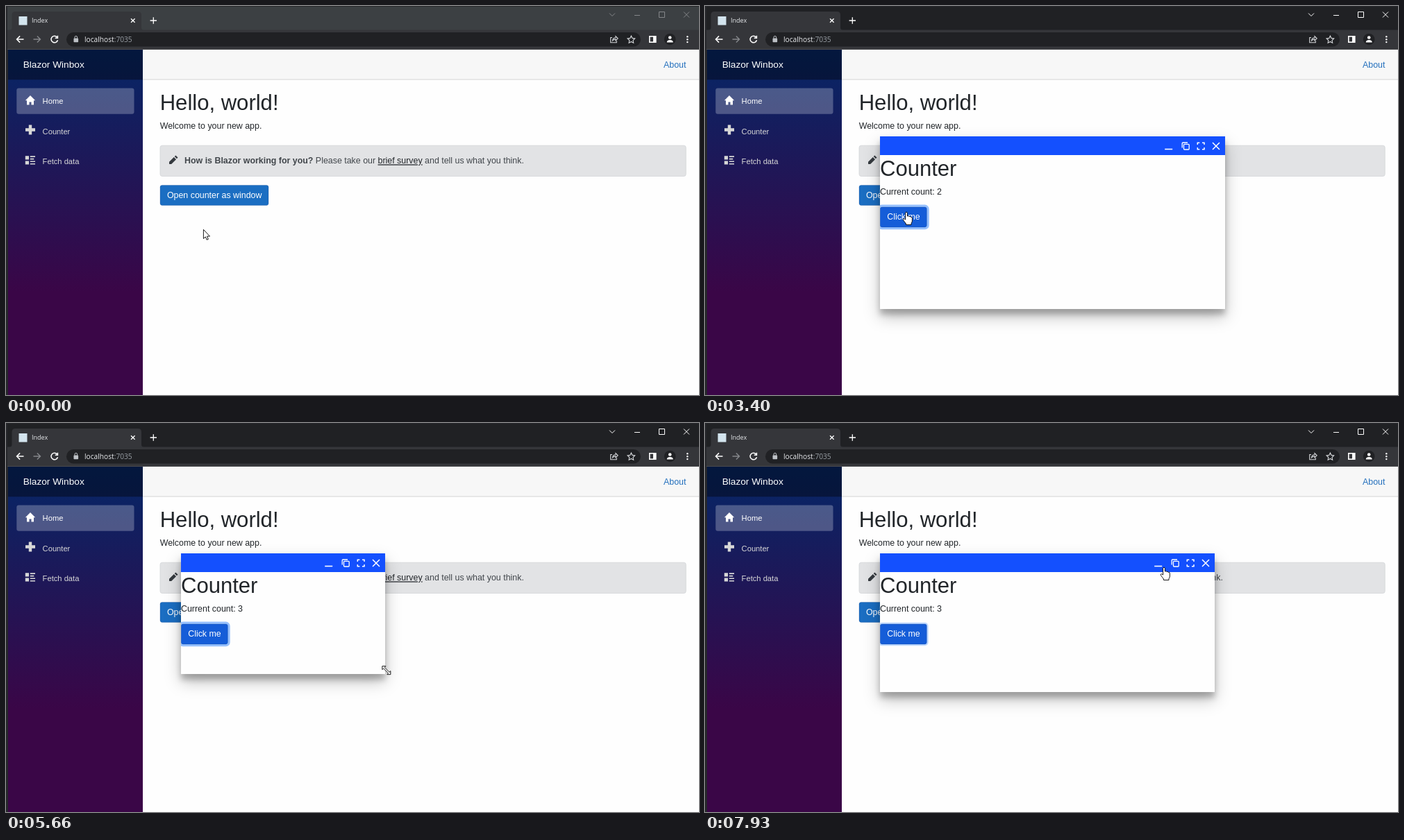
Write an HTML page that moves like this. It is 998 by 561 pixels and loops after 8000 ms.

```html
<!DOCTYPE html>
<html lang="en">
<head>
<meta charset="utf-8">
<title>Blazor Winbox</title>
<style>
  html, body { margin: 0; width: 100%; height: 100%; overflow: hidden; background: #fefefe; }
  svg { position: absolute; left: 0; top: 0; overflow: visible; }
  text { font: 12.42px 'Liberation Sans', Arial, sans-serif; fill: #212529; white-space: pre; }
  .h1 { font-size: 31.05px; }
  .brand { font-size: 13.66px; fill: #fff; }
  .nav { font-size: 11.18px; fill: #d7d7d7; }
  .white { fill: #fff; }
  .ui { font: 10.2px 'Open Sans', 'Noto Sans', sans-serif; fill: #e8eaed; }
  .line { fill: none; stroke: #fff; stroke-width: 1.3; }
  .ring { fill: none; stroke: rgba(49, 132, 253, .5); }
  .face { stroke: rgba(10, 60, 140, .35); stroke-width: .8; }
  #win { position: absolute; left: 251.8px; top: 187.5px; background: #fefefe;
    box-shadow: 0 10.9px 21.7px rgba(0,0,0,.25), 0 7.8px 7.8px rgba(0,0,0,.22); }
  #body { position: absolute; inset: 0; overflow: hidden; }
  #bar { position: absolute; left: 0; right: 0; top: 0; height: 27.2px; background: #1450fe; }
  #controls { left: auto; right: 0; }
  #cursor path { fill: #fff; stroke: #000; stroke-width: .9; stroke-linejoin: round; }
</style>
</head>
<body>
<svg width="998" height="561" viewBox="0 0 998 561">
  <defs>
    <linearGradient id="side" x1="0" y1="0" x2="0" y2="1">
      <stop offset="0" stop-color="#052767"/><stop offset=".7" stop-color="#3a0647"/>
    </linearGradient>
  </defs>
  <!-- browser frame -->
  <rect width="998" height="561" fill="#26272b"/>
  <rect id="strip" x="2" y="1" width="996" height="34"/>
  <path d="M4 35Q8.5 35 8.5 31V13Q8.5 8 13.5 8H190Q195 8 195 13V31Q195 35 199.5 35Z" fill="#35363a"/>
  <rect x="2" y="34.5" width="996" height="28.5" fill="#35363a"/>
  <rect x="2" y="62" width="996" height="1" fill="#4a4b4f"/>
  <rect x="18.5" y="15" width="12" height="12.5" fill="#d3e4ee"/>
  <text class="ui" x="37" y="24.2" style="font-size:9px">Index</text>
  <g class="line">
    <path d="M180 18.2l5.6 5.6m0-5.6l-5.6 5.6M212.3 16.3v9.4m-4.7-4.7h9.4"/>
    <path d="M25.5 48H15.5m4.6-4.6L15.5 48l4.6 4.6" stroke-width="1.5"/>
    <path d="M39.5 48h10m-4.6-4.6l4.6 4.6l-4.6 4.6" stroke="#85878b" stroke-width="1.4"/>
    <path d="M73.6 45A4.8 4.8 0 1 0 74.5 49.2M74.4 42.8v3.4h-3.6" stroke-width="1.5"/>
  </g>
  <rect x="87" y="38" width="827" height="20.5" rx="10.2" fill="#202124"/>
  <rect x="97.5" y="46.6" width="6.6" height="5.6" rx=".8" fill="#bdc1c6"/>
  <path class="line" d="M99 46.8v-1.7a1.8 1.8 0 0 1 3.6 0v1.7" stroke="#bdc1c6" style="stroke:#bdc1c6;stroke-width:1"/>
  <text class="ui" x="113" y="51.7">localhost<tspan fill="#9aa0a6">:7035</tspan></text>
  <g class="line" style="stroke:#d4d6d9;stroke-width:1.1">
    <path d="M873 45.5h-2.3v7.3h8.6v-2.5M873.5 50q.3-4.2 4.5-4.2v-2.2l3.2 3.2l-3.2 3.2v-2.1q-2.800 0-4.500 2.100z"/>
    <path d="M900.400 43l1.600 3.400l3.700.5l-2.700 2.600l.7 3.700l-3.300-1.800l-3.300 1.800l.7-3.700l-2.700-2.600l3.700-.5z"/>
  </g>
  <rect class="line" x="926.800" y="43.800" width="9" height="8.400" style="stroke-width:1.600"/>
  <rect x="932" y="43.800" width="4" height="8.400" fill="#fff"/>
  <circle cx="956.200" cy="48" r="8.300" fill="#202124"/>
  <circle cx="956.200" cy="45.500" r="2.300" fill="#fff"/>
  <path d="M951.700 52.500q0-3.600 4.500-3.600t4.500 3.600z" fill="#fff"/>
  <g fill="#fff"><circle cx="981.300" cy="44.300" r="1.200"/><circle cx="981.300" cy="48.200" r="1.200"/><circle cx="981.300" cy="52.100" r="1.200"/></g>
  <path id="caption" class="line" style="stroke-width:1" d="M869 10.500l4 4l4-4M905 13.500h8M940.500 8.500h8v8h-8zM976 8.500l8 8m0-8l-8 8"/>

  <!-- page -->
  <rect x="197" y="63" width="801" height="498" fill="#fefefe"/>
  <rect x="197" y="63" width="801" height="43" fill="#f7f7f7"/>
  <rect x="197" y="105.500" width="801" height="1" fill="#d6d5d5"/>
  <rect x="3" y="63" width="194" height="498" fill="url(#side)"/>
  <rect x="3" y="63" width="194" height="43.300" fill="#000" opacity=".4"/>
  <text class="brand" x="24.700" y="89">Blazor Winbox</text>
  <rect x="15.300" y="118.500" width="169.200" height="37.300" rx="3" fill="#fff" opacity=".25"/>
  <path d="M35 129l-7.200 7.200h2.200v6.300h3.500v-4h3v4h3.500v-6.300h2.200z" fill="#fff"/>
  <path d="M32.800 171.500h4.400v4.800h4.800v4.400h-4.800v4.800h-4.400v-4.800H28v-4.400h4.800z" fill="#d7d7d7"/>
  <path d="M27.800 216.200h5.200v5.200h-5.200zM27.800 223.400h5.200v5.200h-5.200zM34.800 216.200h7.200v1.700h-7.200zM34.800 219.700h5.500v1.700h-5.500zM34.800 223.400h7.200v1.700h-7.200zM34.800 226.900h7.200v1.700h-7.200z" fill="#d7d7d7"/>
  <text class="nav white" x="52.600" y="141">Home</text>
  <text class="nav" x="52.600" y="184.500">Counter</text>
  <text class="nav" x="52.600" y="228">Fetch data</text>
  <text x="947" y="88.500" style="fill:#2470bd">About</text>
  <text class="h1" x="221.700" y="149.600">Hello, world!</text>
  <text x="221.700" y="177.200">Welcome to your new app.</text>
  <rect x="222" y="201.200" width="757.200" height="44.300" rx="3" fill="#e2e3e5" stroke="#d3d6d8" stroke-width=".8"/>
  <path d="M235 228v-3.200l6.800-6.800l3.200 3.200l-6.800 6.800zM242.700 217.100l1.700-1.600l3.100 3.100l-1.600 1.700z" fill="#353a3f"/>
  <text x="257" y="227.400" style="fill:#41464b"><tspan font-weight="bold">How is Blazor working for you?</tspan> Please take our <tspan fill="#212529" text-decoration="underline">brief survey</tspan> and tell us what you think.</text>
  <g id="open">
    <rect class="ring" x="221.700" y="258.200" width="156.600" height="29.500" rx="3"/>
    <rect class="face" x="222" y="258.500" width="156" height="28.900" rx="2.800"/>
    <text class="white" x="231.900" y="276.800">Open counter as window</text>
  </g>
</svg>

<div id="win">
  <div id="body">
    <svg width="500" height="260">
      <text class="h1" x="0" y="56.600">Counter</text>
      <text x="0" y="83.800">Current count: <tspan id="count">0</tspan></text>
      <g id="click">
        <rect class="ring" x="0" y="101.700" width="67.600" height="29.500" rx="3"/>
        <rect class="face" x=".3" y="102" width="67" height="28.900" rx="2.800"/>
        <text class="white" x="10.200" y="120.300">Click me</text>
      </g>
    </svg>
    <div id="bar">
      <svg id="controls" class="line" width="100" height="27">
        <path d="M13.200 18.500h11" stroke-width="1.600"/>
        <path d="M38.200 16.500V10q0-1 1-1H46"/>
        <rect x="40.500" y="11.300" width="7.700" height="7.700" rx="1"/>
        <path d="M60.300 12V9.200h3M67 9.200h3V12M70 16v2.800h-3M63.300 18.800h-3V16" stroke-width="1.500"/>
        <path d="M82 9l10 10m0-10l-10 10" stroke-width="1.500"/>
      </svg>
    </div>
  </div>
</div>

<svg id="cursor" width="1" height="1">
  <path id="arrow" d="M.4 .4V13.500L3.300 10.900L5.200 15.200L7.300 14.300L5.500 10.100H9.500Z"/>
  <path id="hand" d="M-1.400 11V1.600Q-1.400 .3 0 .3T1.400 1.600V6Q3.800 5.400 4 6.600Q6 6.200 6.300 7.300Q8.400 7 8.400 9V13Q8.200 15 7 16.500V18.500H-.5V17Q-2.500 14.500-4.600 11.500Q-5.200 9.600-3.600 9.600Z"/>
  <path id="resize" d="M-6 -6H-1L-2.700 -4.200L4.200 2.700L6 1V6H1L2.700 4.200L-4.200 -2.700L-6 -1Z"/>
</svg>

<script>
const LOOP = 8000, STEP = 1000 / 15;
const $ = id => document.getElementById(id);
const clamp = v => Math.min(1, Math.max(0, v));
const fade = (t, from, ms = 150) => clamp((t - from) / ms);
const smooth = p => p * p * (3 - 2 * p);
const linear = p => p;

// Rows are [time, x, y].
const pointer = [
  [130, 284, 322], [860, 303, 276], [1530, 303, 276], [2060, 630, 230],
  [2200, 664, 214], [2400, 664, 214], [2466, 657, 214], [3060, 290, 297],
  [3540, 290, 297], [3860, 785, 471], [3940, 785, 471], [4530, 750, 437],
  [6740, 735, 388], [7130, 661, 208]
];
const corner = [
  [4670, 749, 437], [4860, 751.5, 437], [4940, 751.5, 437], [5133, 668, 441],
  [5333, 548.5, 444], [5460, 543, 428], [5600, 545, 375], [5800, 549, 335],
  [5860, 549, 336], [6067, 549.5, 362], [6200, 555, 380], [6400, 690, 384],
  [6530, 744, 387], [6660, 734, 388]
];
const shapes = [
  [0, 'arrow'], [620, 'hand'], [1650, 'arrow'], [2130, 'hand'], [2560, 'arrow'],
  [2960, 'hand'], [3620, 'arrow'], [4400, 'resize'], [6780, 'arrow'], [7040, 'hand']
];
const clicks = [3260, 3390, 3520];

function sample(track, t, ease) {
  const next = track.findIndex(row => row[0] > t);
  if (next === 0) return track[0].slice(1);
  if (next < 0) return track[track.length - 1].slice(1);
  const [t0, x0, y0] = track[next - 1], [t1, x1, y1] = track[next];
  const p = ease((t - t0) / (t1 - t0));
  return [x0 + (x1 - x0) * p, y0 + (y1 - y0) * p];
}

function paintButton(id, hover, ring) {
  const [halo, face] = $(id).children;
  halo.style.strokeWidth = 6.2 * ring;
  halo.style.opacity = ring;
  face.style.fill = `color-mix(in srgb, #155dd8 ${hover * 100}%, #1b6ec2)`;
}

function render(t) {
  const active = t >= 1330;
  $('strip').style.fill = active ? '#202124' : '#3c4043';
  $('caption').style.stroke = active ? '#fff' : '#85878a';

  const blur = fade(t, 3190);
  paintButton('open', fade(t, 610) - blur, fade(t, 1320) - blur);
  paintButton('click', fade(t, 2950), fade(t, 3190) - fade(t, 7880));
  $('count').textContent = clicks.filter(at => t >= at).length;

  const [right, bottom] = sample(corner, t, linear);
  const win = $('win').style;
  win.opacity = fade(t, 1360, 200);
  win.width = right - 251.8 + 'px';
  win.height = bottom - 187.5 + 'px';

  let [x, y] = sample(pointer, t, smooth);
  if (t > 4600 && t < 6740) {
    [x, y] = sample(corner, t + 25, linear);
    x += 1;
  }
  $('cursor').style.transform = `translate(${x}px, ${y}px)`;
  const shape = shapes.filter(row => row[0] <= t).pop()[1];
  for (const path of $('cursor').children) path.style.display = path.id === shape ? '' : 'none';
}

const start = performance.now();
function tick() {
  const t = (performance.now() - start) % LOOP;
  render(Math.floor((t + 7) / STEP) * STEP);
  requestAnimationFrame(tick);
}
tick();
</script>
</body>
</html>
```
